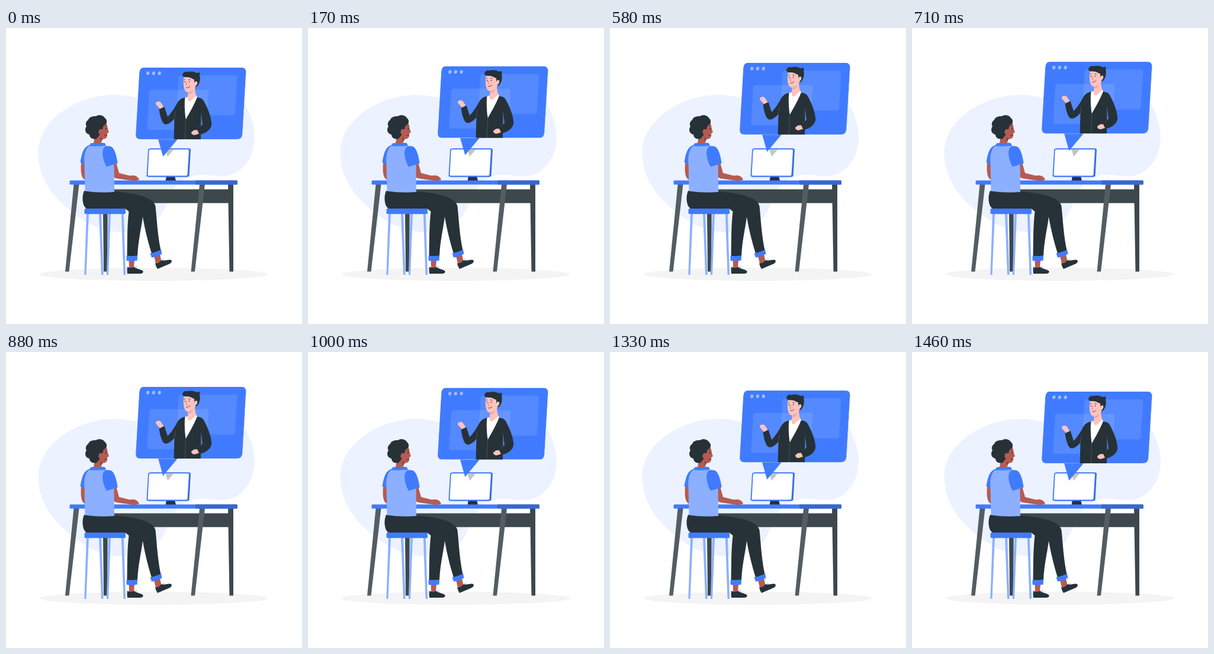
Write an HTML page that moves like this. It is 500x500 px and loops after 1.5 s.

```html
<!DOCTYPE html>
<html lang="en">
<head>
<meta charset="utf-8">
<title>Online lesson</title>
<style>
html, body { margin: 0; width: 100%; height: 100%; overflow: hidden; background: #fff; }
svg { display: block; width: 100%; height: 100%; }
.blue { fill: #407bff; }
.pale { fill: #8cb0ff; }
.deep { fill: #3868cf; }
.dark { fill: #263238; }
.leg { fill: #535d62; }
.beam { fill: #3d484d; }
.skin { fill: #b55b52; }
.shade { fill: #934238; }
.pink { fill: #ffc3bd; }
.white { fill: #fff; }
.line { fill: none; stroke: #263238; stroke-width: .8; stroke-linecap: round; }
</style>
</head>
<body>
<svg viewBox="0 0 500 500">
  <defs>
    <path id="panel" d="M233 67H398Q406 67 405.5 75.500L399.500 179Q398.800 188 390.500 188H227Q219 188 219.400 179.500L225.400 76Q226 67 233 67Z"/>
    <clipPath id="panelClip"><use href="#panel"/></clipPath>
    <path id="screen" d="M243.500 205.300H307.300Q309 205.300 308.900 207L306.400 247.500Q306.200 249.500 304.200 249.500H241.300Q239.300 249.500 239.500 247.500L241.700 207Q241.900 205.300 243.500 205.300Z"/>
    <clipPath id="screenClip"><use href="#screen"/></clipPath>
  </defs>

  <path fill="#ecf2ff" d="M183 113C120 113 55 155 54.500 210C54 265 95 300 127 322C162 346 205 352 240 336C272 320 272 280 292 262C306 249 325 246 342 248.500C377 254 391 246 404 231C416 217 421 198 419.500 178C418 158 410 139 402 126C385 105 350 120 325 140C300 158 275 143 250 129C229 118 206 113 183 113Z"/>
  <ellipse cx="249.500" cy="416" rx="193" ry="11" fill="#f4f4f4"/>

  <!-- desk -->
  <path class="beam" d="M164 272.500H378V295.800H164ZM375 264H384L384 411.500H377.500ZM163.500 264H172L171 411.500H165Z"/>
  <path class="leg" d="M114.500 264H123.500L106.500 411.500H100ZM327 264H336L319 411.500H312.500Z"/>
  <path class="dark" d="M271 250H285L287 258H269.500Z"/>
  <rect class="blue" x="107.500" y="257.500" width="283.500" height="7" rx="1.500"/>
  <path class="deep" d="M320 257.500H389.500Q391 257.500 391 259V263Q391 264.500 389.500 264.500H320Z"/>

  <!-- monitor -->
  <path class="deep" d="M244 203.500H309.500Q312 203.500 311.900 206L309.600 248.500Q309.300 251.500 306.500 251.500H241Z"/>
  <path class="blue" d="M243.500 203.500H307.500Q310.500 203.500 310.300 206.500L307.800 248.300Q307.500 251.500 304.500 251.500H240.300Q237.300 251.500 237.500 248.300L240 206.500Q240.300 203.500 243.500 203.500Z"/>
  <use href="#screen" class="white"/>
  <path clip-path="url(#screenClip)" fill="#c4c4c4" d="M264.500 188H298.500L273 217.300Z"/>

  <!-- stool -->
  <path class="pale" d="M136 313H140L135.500 417H132.300ZM157 313H161L164.500 417H161ZM173 313H177L173 417H169.800ZM194.800 313H198.800L202 417H198.500Z"/>

  <!-- student -->
  <path class="skin" d="M207.500 392H217L216 405H208ZM250 385L260 382L262.500 394L253 398Z"/>
  <path class="dark" d="M205 403.500C209 405.500 213 405.500 217 403.500C221 408 231 407.500 231.700 411.500Q231.500 415 226 415H205Q204 409 205 403.500ZM252 397.500C257 397.500 260 395 263 392C269 394.500 276 389.500 279.500 392.500Q281 396 276 398.500L256 407Q253 403 252 397.500Z"/>
  <path fill="none" stroke="#8cb0ff" d="M217 404.500L221 402M219 406L222 404M263.500 392.500L266.500 389.500M265.500 393L268.500 391"/>
  <path class="dark" d="M132 275C127.500 285 129 302 137 305.500H202L207.500 310C204.500 335 205 362 204.500 385.500L222 386C223 361 228 341 231 319C235 342 240 362 246 381L261.500 375.500C256 350 255 325 252.500 301C250 286 219 279 183 276Z"/>
  <path class="blue" d="M203.500 384.500Q213 386.500 222.200 384L221.500 392.800Q212 394.500 203.500 393ZM243.500 380.500Q254 379 262 374.300L263.500 381.500Q256 386.500 246 387.800Z"/>
  <rect class="blue" x="132.500" y="305" width="69.500" height="9.200" rx="2"/>
  <path class="skin" d="M127 227C126 240 126 253 133.500 256.500L135 228Z"/>
  <path class="blue" d="M143 197C130 200 128 213 125.500 227L133 230.500L145 205Z"/>
  <path class="skin" d="M172 233L186 227L191 245L209 249.500C215 248 222 249 225 256Q223 258 214 258L186 254C176 250 174 240 172 233Z"/>
  <path class="pale" d="M143 197.500C135 201 131 214 132.500 229L133.500 275.500Q158 279 183 277L182.500 231L172 199Z"/>
  <path class="blue" d="M168 200C161.500 203 161 218 170 234.500L188.700 228.500C186 211 182 199.500 174 199.500ZM143 194.800Q156 192.500 167 194.500L169 199Q154 200 140.500 199.500Z"/>
  <path class="skin" d="M155 166L169 160C172 165 171 170 174 176L171 178C171.500 184 170 188 163 187.500Q161 192 160 195H148L150 181Z"/>
  <path class="shade" d="M159 184Q162 187.500 165 187.500L162.500 188.500L160.500 193Z"/>
  <path class="dark" d="M139 155C141 149 149 149 152 149C157 145.500 165 148 167 152C171 155 171 160 168 163C166 164 164 165 163.500 170L160.500 173L158 181L153 187C146 189 141 185 141 180C134 179 132 171 136 166C133 162 136 157 139 155Z"/>
  <ellipse class="skin" cx="159.500" cy="175" rx="3" ry="4.300" transform="rotate(15 159.500 175)"/>
  <ellipse class="dark" cx="169" cy="170.500" rx=".8" ry="1.200"/>
  <path class="line" d="M167.500 166.500L170 165.500M166.500 181.500Q168.500 182 170.500 180.700"/>

  <!-- call window -->
  <g id="call">
    <path class="blue" d="M256.500 186H291.500L265.300 217.200Z"/>
    <use href="#panel" class="deep"/>
    <use href="#panel" fill="none" stroke="#e4e9f3" stroke-width=".6" transform="translate(-.2 -.2)"/>
    <g clip-path="url(#panelClip)">
      <use href="#panel" class="blue" transform="translate(-.8 -.6)"/>
      <g class="white">
        <path opacity=".1" d="M246 104.500H339Q342.500 104.500 342.300 108L339 168.500Q338.800 172 335 172H241.500Q238 172 238.300 168.500L242 108Q242.300 104.500 246 104.500Z"/>
        <path opacity=".1" d="M295 80H387Q390.500 80 390.300 83.500L387 144Q386.800 147.500 383 147.500H291.500Q288 147.500 288.200 144L291.300 83.500Q291.500 80 295 80Z"/>
        <g id="dots" opacity=".5"></g>
      </g>
      <path class="pink" d="M267 134L262 126.500Q259 123 257.500 124.500L254 125Q251.500 128 255 131L260.500 137Z"/>
      <path class="white" d="M302 118Q312 114 323 117L320 140L305 158L299 135Z"/>
      <path class="pink" d="M307 104L319 99Q319 111 323 117C319 123 311 125 304.500 122.500Q309 115 307 104Z"/>
      <path class="pink" d="M300.500 84C299 94 300 107 306 108.500C313 109 319 104 320.500 97L322 86L312 79Z"/>
      <path fill="#f5a39b" d="M308.500 108.300Q314 107.500 317 104Q314 111 309 112Z"/>
      <path class="dark" d="M298 79.500C298.500 75 303 73 306.500 74.500C311 72.500 319 73.500 321.500 76C324 75 326 75.500 326.500 77L328 78L327 80C329 86 327 96 321.500 100L318.500 96L318 87C314 86 312 83 306 83C301 83 298 82 298 79.500Z"/>
      <path class="dark" d="M325 76L327.500 74.500L326.500 79Z"/>
      <ellipse class="pink" cx="320.500" cy="94" rx="2.500" ry="4" transform="rotate(20 320.500 94)"/>
      <g class="dark">
        <ellipse cx="302.600" cy="91.300" rx=".7" ry="1.100"/>
        <ellipse cx="309.500" cy="91" rx=".7" ry="1.100"/>
      </g>
      <path class="line" d="M301 88L303 87.200M308.500 87.300Q310 86.500 311.500 87.800"/>
      <path class="line" stroke="#b55b52" style="stroke:#d9736a" d="M305.500 91.500L304 96.500L306 96.700"/>
      <path class="line" d="M304.500 101Q308 102 311 98.700"/>
      <path class="white" d="M302 118L305.500 116.500L308 123L304 126ZM321.500 114.500L323.500 119L317 126L312 123Z"/>
      <path class="dark" d="M302.500 117.500C295 118.500 291 123 288 129C283 138 278 145 273 150L267.500 133L258.500 137.500C260 147 262 156 266 161C271 166 280 159 284.500 153L283.500 190H329L329.500 145L332 163L321 172.500L325 180.500C335 179 346 173 347.300 163C347 150 340 134 334.500 124C332 119 328 117.500 322.500 117.500C319 128 310 143 303.500 155C302 142 301 128 302.500 117.500Z"/>
      <path fill="none" stroke="#59646a" stroke-width=".6" d="M303.500 155L302.500 188M329.500 144L330.500 163L326 169M284.500 153L286 141"/>
      <path class="pink" d="M323 172.300L317.500 172.500L313 176Q312.500 178 314.500 179.500Q317 181.500 320 180.500L326 178.500Z"/>
    </g>
  </g>
</svg>
<script>
const LOOP = 1500, TRAVEL = 1460, LIFT = 10;
const call = document.getElementById("call");

document.getElementById("dots").innerHTML = [239.7, 249.4, 259.2]
  .map(x => `<ellipse cx="${x}" cy="76.500" rx="2.600" ry="3.100" transform="rotate(15 ${x} 76.500)"/>`)
  .join("");

// Linear rise and fall, with a short rest before the loop restarts.
function draw(time) {
  const p = Math.min(time % LOOP / TRAVEL, 1);
  const lift = LIFT * (1 - Math.abs(1 - 2 * p));
  call.setAttribute("transform", `translate(0 ${-lift.toFixed(3)})`);
}

const start = performance.now();
function tick() {
  draw(performance.now() - start);
  requestAnimationFrame(tick);
}
tick();
</script>
</body>
</html>
```
